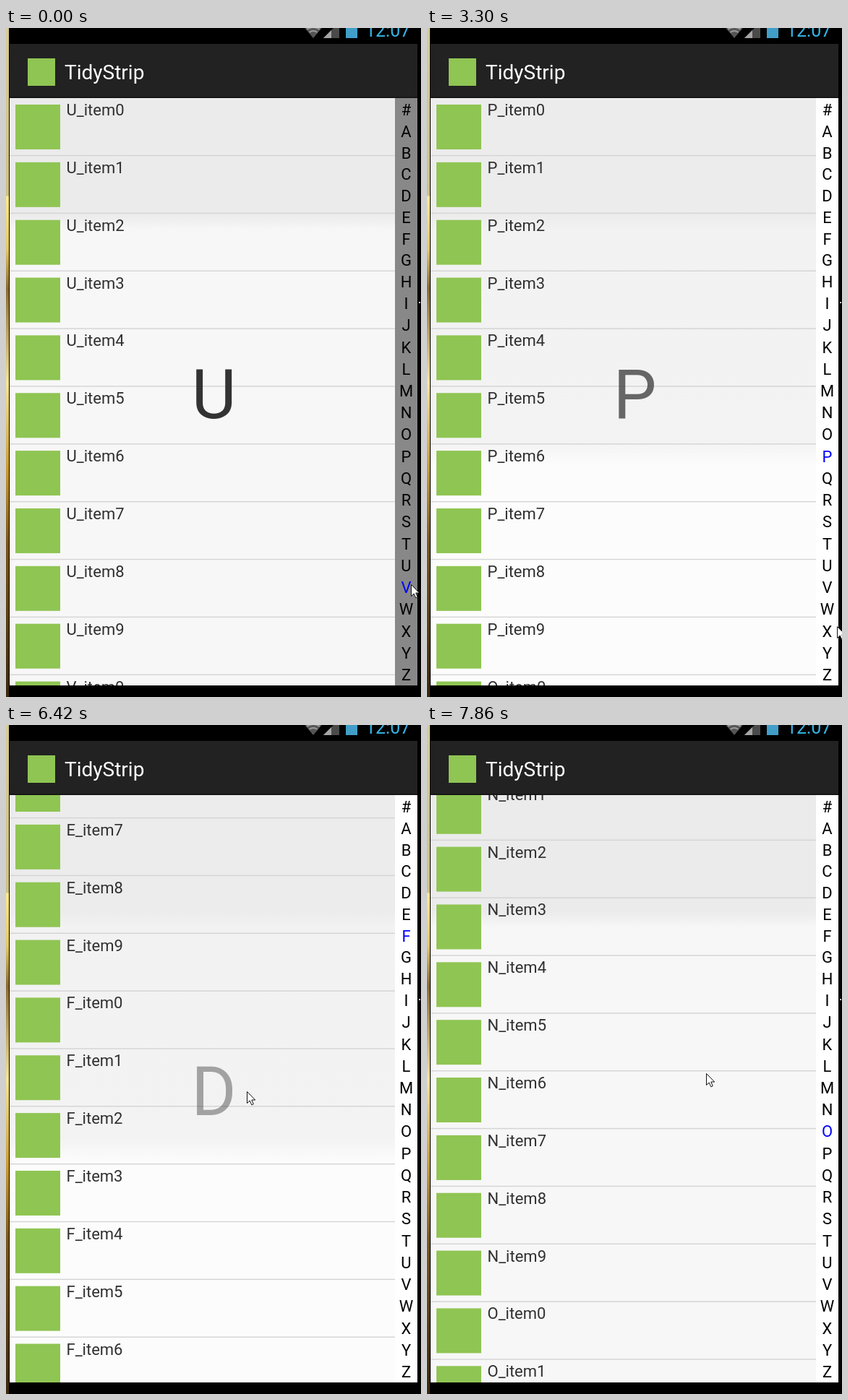
These frames come from a looping animation (574x926 px, 8 s). An HTML page:

```html
<!DOCTYPE html>
<html lang="en">
<head>
<meta charset="utf-8">
<title>TidyStrip</title>
<style>
html, body { margin: 0; width: 100%; height: 100%; overflow: hidden; background: #000; }
svg { display: block; width: 574px; height: 926px; font-family: Roboto, "Noto Sans", sans-serif; }
</style>
</head>
<body>
<svg viewBox="0 0 574 926">
  <defs>
    <clipPath id="listClip"><rect x="5" y="97" width="533" height="813"/></clipPath>
    <linearGradient id="gold" x1="0" y1="0" x2="0" y2="1">
      <stop offset="0" stop-color="#d6cb96"/>
      <stop offset=".25" stop-color="#cdc084"/>
      <stop offset=".252" stop-color="#fae98c"/>
      <stop offset=".33" stop-color="#e4c766"/>
      <stop offset=".39" stop-color="#8a6a30"/>
      <stop offset=".53" stop-color="#f4e498"/>
      <stop offset=".66" stop-color="#c89a34"/>
      <stop offset=".77" stop-color="#7a561c"/>
      <stop offset="1" stop-color="#3a280e"/>
    </linearGradient>
    <linearGradient id="twoTone" x1="0" y1="0" x2="0" y2="1">
      <stop offset=".198" stop-color="#ebebeb"/>
      <stop offset=".225" stop-color="#f7f7f7"/>
    </linearGradient>
    <linearGradient id="threeTone" x1="0" y1="0" x2="0" y2="1">
      <stop offset=".198" stop-color="#ececec"/>
      <stop offset=".225" stop-color="#f2f2f2"/>
      <stop offset=".585" stop-color="#f3f3f3"/>
      <stop offset=".625" stop-color="#fcfcfc"/>
    </linearGradient>
  </defs>

  <rect width="574" height="926"/>
  <rect width="4" height="926" fill="url(#gold)"/>

  <!-- status bar -->
  <path d="M412.500 -1Q425 -10 437.500 -1L425 14Z" fill="#555"/>
  <path d="M416 2Q425 -4 434 2M419.500 6Q425 2 430.500 6" fill="none" stroke="#999" stroke-width="2"/>
  <path d="M439 14L461 -8V14Z" fill="#4a4a4a"/>
  <path d="M439 14L450 3V14Z" fill="#a5a5a5"/>
  <rect x="470" y="-4" width="16" height="18" fill="#419ec9"/>
  <text x="497" y="12" font-size="25" fill="#33b5e5">12:07</text>

  <!-- action bar -->
  <rect x="5" y="22" width="564" height="75" fill="#222"/>
  <rect x="5" y="95.500" width="564" height="1.500" fill="#111"/>
  <rect x="30" y="42" width="38" height="38" fill="#8fc553"/>
  <text x="81" y="71" font-size="28" fill="#fff">TidyStrip</text>

  <rect id="back" x="5" y="97" width="533" height="813"/>
  <g clip-path="url(#listClip)"><g id="rows" font-size="22" fill="#303030"></g></g>
  <text id="big" x="287.500" y="540" font-size="95" text-anchor="middle" fill="#333"></text>
  <rect id="bar" x="538" y="97" width="31" height="813"/>
  <g id="index" font-size="22" text-anchor="middle"></g>
  <rect x="571" y="379" width="2" height="2" fill="#ddd"/>
  <path id="arrow" d="M.5 .5V16.500L4.200 13L6.800 18.800L9.300 17.700L6.800 12H11.700Z" fill="#fff" stroke="#111"/>
</svg>
<script>
const LOOP = 8000, STEP = 930 / 7, LAG = 150, FLING = 6000;
const TOP = 97, PITCH = 79.85, LAST_ROW = 249.8;
const KEYS = "#ABCDEFGHIJKLMNOPQRSTUVWXYZ";

// pointer stops: time, x, y, and 1 if the strip is held until the next stop
const stops = [
  [-150, 560, 748, 1], [0, 560, 770, 1], [2050, 552, 538, 0],
  [2500, 552, 538, 1], [2940, 553, 597, 0], [3210, 567, 828, 0],
  [3500, 556, 836, 1], [3919, 553, 897, 0], [4530, 571, 114, 0],
  [4850, 555, 140, 1], [5820, 552, 236, 0],
  [6000, 315, 633, 0], [6930, 358, 340, 0], [7860, 386, 482, 0]
].map(([t, x, y, held]) => ({ t, x, y, held }));

const $ = id => document.getElementById(id);
const set = (el, name, value) => el.setAttribute(name, value);
function add(parent, tag, attrs) {
  const el = document.createElementNS("http://www.w3.org/2000/svg", tag);
  for (const k in attrs) set(el, k, attrs[k]);
  return parent.appendChild(el);
}

function pointer(t) {
  const i = stops.findLastIndex(s => s.t <= t);
  const a = stops[i], b = stops[i + 1] || a;
  const u = b === a ? 0 : (t - a.t) / (b.t - a.t);
  return { x: a.x + (b.x - a.x) * u, y: a.y + (b.y - a.y) * u };
}

// the pitch of the letters grows slightly after the ninth
const keyY = i => 113 + 29.78 * i + 0.46 * Math.max(0, i - 9);
function keyAt(y) {
  let i = 0;
  while (i < KEYS.length - 1 && y > (keyY(i) + keyY(i + 1)) / 2) i++;
  return i;
}

// last hold of the strip begun by time t: when it ends and its letter
function touch(t) {
  const end = stops[stops.findLastIndex(s => s.held && s.t <= t) + 1].t;
  return { end, key: keyAt(pointer(Math.min(t, end)).y) };
}

// the list speeds up slightly from one fling to the next
function flungRow(t) {
  const s = (t - FLING) / 1000;
  return 30 + 38.17 * s + 8.735 * s * s;
}

const rows = Array.from({ length: 12 }, () => {
  const g = add($("rows"), "g", {});
  add(g, "rect", { x: 13, y: 9, width: 62, height: 62, fill: "#8fc553" });
  add(g, "rect", { x: 5, y: PITCH - 1, width: 533, height: 1.4, fill: "#d4d4d4" });
  return { g, label: add(g, "text", { x: 83.5, y: 24 }) };
});
const keys = [...KEYS].map((c, i) => {
  const el = add($("index"), "text", { x: 553.5, y: keyY(i) + 8 });
  el.textContent = c;
  return el;
});

function draw(t) {
  const { end, key } = touch(t), section = touch(t - LAG).key;
  const flung = t >= FLING;
  const row = flung ? flungRow(t) : Math.min(LAST_ROW, Math.max(0, section - 1) * 10);
  const active = flung ? Math.ceil(row / 10) + 1 : key;

  rows.forEach(({ g, label }, k) => {
    const n = Math.floor(row) + k;
    set(g, "transform", `translate(0 ${TOP + (n - row) * PITCH})`);
    set(g, "visibility", n < 260 ? "visible" : "hidden");
    label.textContent = `${KEYS[Math.floor(n / 10) + 1]}_item${n % 10}`;
  });
  keys.forEach((el, i) => set(el, "fill", i === active ? "#00f" : "#000"));

  $("big").textContent = KEYS[section];
  set($("big"), "opacity", Math.max(0, Math.min(1, 1 - (t - end) / 1000)));
  set($("bar"), "fill", t < end ? "#888" : "#fff");
  set($("back"), "fill", t > 1300 && t < 7500 ? "url(#threeTone)" : "url(#twoTone)");
  const { x, y } = pointer(t);
  set($("arrow"), "transform", `translate(${Math.round(x)} ${Math.round(y)})`);
}

// the screen refreshes at a steady, low rate
function frame() {
  const now = performance.now() % LOOP;
  const tick = FLING + Math.floor((now - FLING) / STEP + 0.01) * STEP;
  draw(Math.max(0, tick));
  requestAnimationFrame(frame);
}
frame();
</script>
</body>
</html>
```
